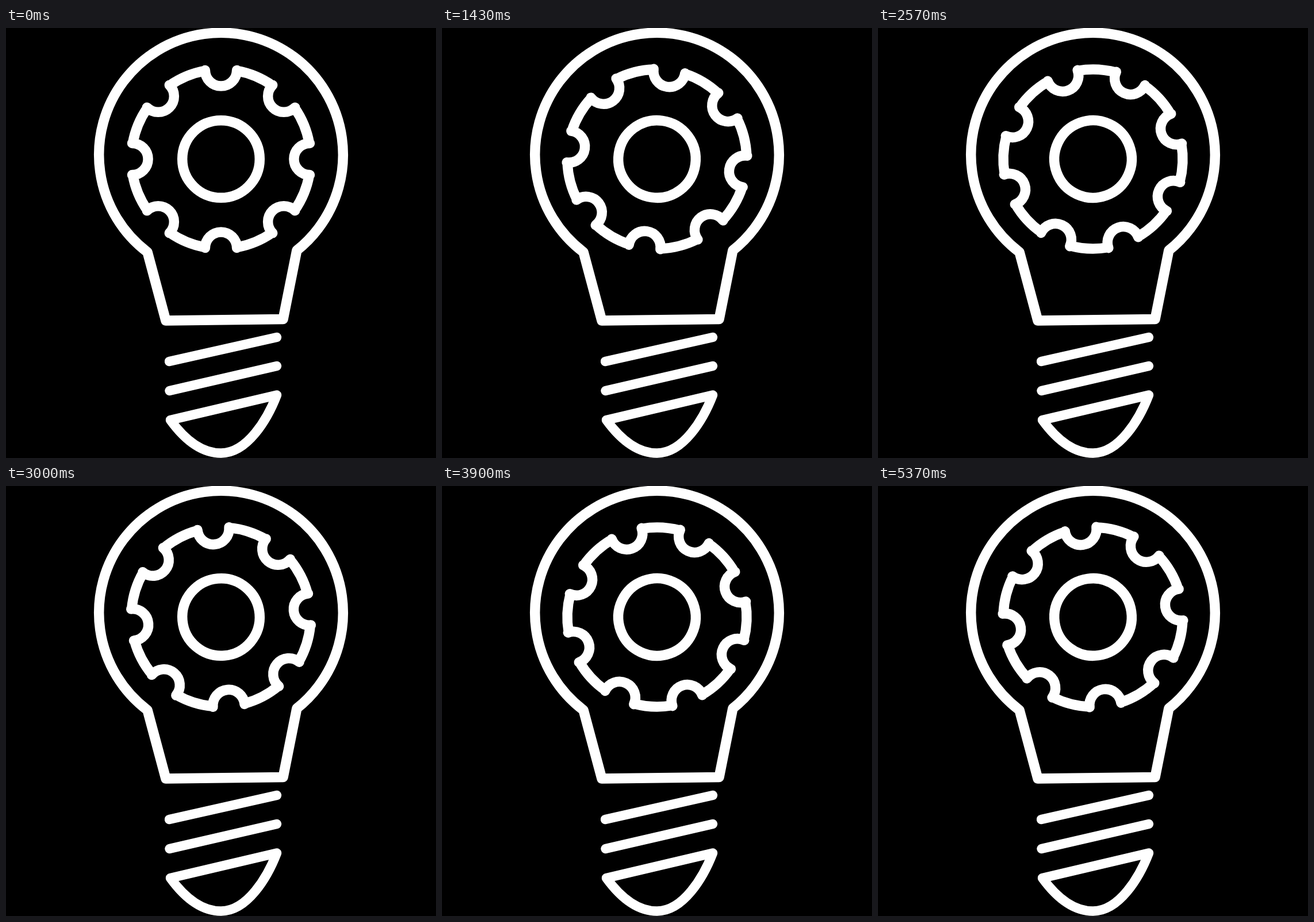
An HTML page with a canvas for the animation above (5410 ms loop, 748 by 748 pixels).

```html
<!DOCTYPE html>
<html lang="en">
<head>
<meta charset="utf-8">
<title>Idea bulb</title>
<style>
html, body { margin: 0; width: 100%; height: 100%; overflow: hidden; background: #000; }
canvas { display: block; width: 748px; height: 748px; }
</style>
</head>
<body>
<canvas id="stage" width="748" height="748"></canvas>
<script>
const ctx = document.getElementById('stage').getContext('2d');
const LOOP = 5410;
const STEPS = 162;
const TEETH = 8;
const RAD = Math.PI / 180;

function stroke(width, draw) {
  ctx.lineWidth = width;
  ctx.beginPath();
  draw();
  ctx.stroke();
}

function line(x1, y1, x2, y2) {
  ctx.moveTo(x1, y1);
  ctx.lineTo(x2, y2);
}

function drawBulb() {
  stroke(17.5, () => {
    const cx = 374, cy = 220.5, r = 212.3;
    ctx.arc(cx, cy, r, Math.atan2(388 - cy, 247.5 - cx), Math.atan2(387 - cy, 506 - cx));
    ctx.lineTo(482, 506.5);
    ctx.lineTo(278, 509);
    ctx.closePath();
  });
  stroke(16.5, () => {
    line(284, 580, 471, 538);
    line(284.5, 631, 471, 588);
    line(286, 682, 471, 638.5);
    ctx.bezierCurveTo(455, 680, 420, 739.5, 374, 739.5);
    ctx.bezierCurveTo(340, 739.5, 310, 715, 286, 682);
    ctx.closePath();
  });
}

function drawGear(angle) {
  ctx.save();
  ctx.translate(374, 228);
  ctx.rotate(angle * RAD);
  stroke(17.5, () => ctx.arc(0, 0, 67.3, 0, Math.PI * 2));
  stroke(17.5, () => {
    const pitch = 360 / TEETH, half = 10.2;
    for (let i = 0; i < TEETH; i++) {
      const mid = i * pitch, a = mid * RAD;
      // round notch, then the rim up to the next one
      ctx.arc(154.5 * Math.cos(a), 154.5 * Math.sin(a), 27.6,
        a - Math.PI / 2, a + Math.PI / 2, true);
      ctx.arc(0, 0, 156, (mid + half) * RAD, (mid + pitch - half) * RAD);
    }
    ctx.closePath();
  });
  ctx.restore();
}

// Three steps per 100 ms, lasting 30, 40 and 30 ms
function stepAt(t) {
  const rest = t % 100;
  const n = 3 * Math.floor(t / 100) + (rest >= 70 ? 2 : rest >= 30 ? 1 : 0);
  return Math.min(n, STEPS - 1);
}

// 4 degrees per step, with a double step after every ninth
function gearAngle(n) {
  return 4 * (n + Math.floor(n / 9));
}

function render(t) {
  ctx.fillStyle = '#000';
  ctx.fillRect(0, 0, 748, 748);
  ctx.strokeStyle = '#fff';
  ctx.lineCap = ctx.lineJoin = 'round';
  drawBulb();
  drawGear(gearAngle(stepAt(t)));
}

const start = performance.now();
function tick() {
  render((performance.now() - start) % LOOP);
  requestAnimationFrame(tick);
}
tick();
</script>
</body>
</html>
```
